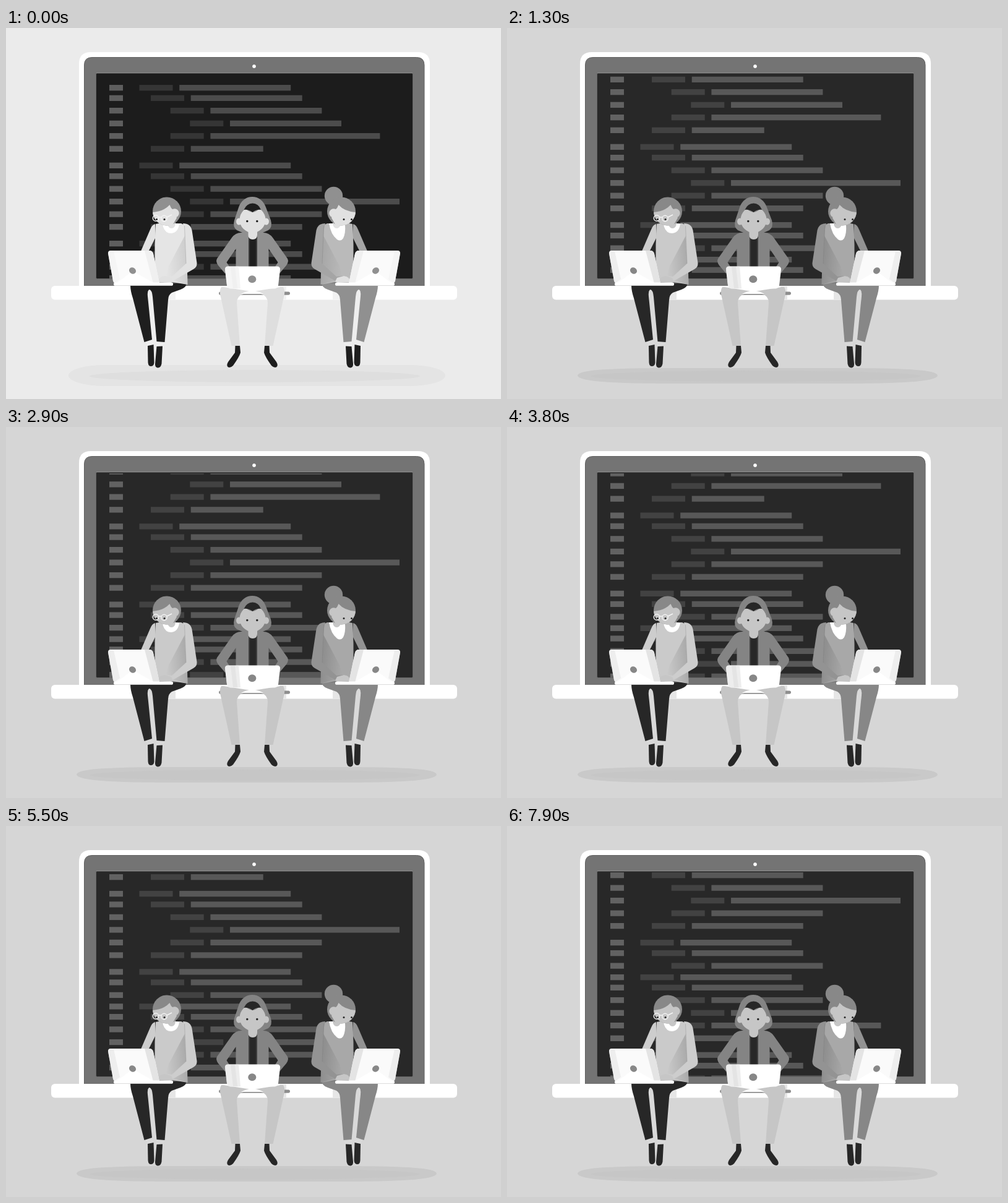
Recreate the animation shown at these times as an HTML page. Size 800 by 600 pixels, loop 8 s.

```html
<!DOCTYPE html>
<html lang="en">
<head>
<meta charset="utf-8">
<title>Three coders</title>
<style>
html, body { margin: 0; width: 100%; height: 100%; overflow: hidden; }
svg {
  display: block; width: 800px; height: 600px;
  --bg: #d6d6d6; --screen: #282828; --number: #626262; --label: #424242; --bar: #585858;
  --skin: #c6c6c6; --hair: #888; --hood: #848484; --dark: #272727;
  --pale: #c6c6c6; --mid: #878787; --shelfShade: #e6e6e6; --lidShade: #e4e4e4; --ankle: #d9d9d9;
  --sweater: #cacaca; --sleeve: #cdcdcd; --jacket: #a8a8a8; --cuff: #939393; --fold: .17;
}
svg.intro {
  --bg: #ebebeb; --screen: #1c1c1c; --number: #5e5e5e; --label: #353535; --bar: #4c4c4c;
  --skin: #e1e1e1; --hair: #909090; --hood: #909090; --dark: #1e1e1e;
  --pale: #dedede; --mid: #909090; --shelfShade: #f2f2f2; --lidShade: #f0f0f0; --ankle: #eee;
  --sweater: #e5e5e5; --sleeve: #e2e2e2; --jacket: #bababa; --cuff: #a5a5a5; --fold: .11;
}
.intro .settled, svg:not(.intro) .opening { display: none; }
</style>
</head>
<body>
<svg id="stage" viewBox="0 0 800 600" class="intro">
  <defs>
    <clipPath id="window"><rect x="146" y="75" width="511" height="330"/></clipPath>
    <clipPath id="head"><circle cx="260" cy="296.5" r="23"/></clipPath>
    <linearGradient id="fold" x1="1" y1=".4" x2="0" y2=".6">
      <stop offset="0" stop-color="#000"/><stop offset="1" stop-color="#000" stop-opacity="0"/>
    </linearGradient>
  </defs>
  <rect width="800" height="600" fill="var(--bg)"/>
  <g class="opening">
    <rect x="101" y="545" width="609" height="34" rx="58" ry="17" fill="#e4e4e4"/>
    <ellipse cx="402" cy="563" rx="267" ry="10" fill="#dedede"/>
  </g>
  <g class="settled">
    <path d="M114 562C116 553 160 550 270 550H540C650 550 694 553 696 562C694 571 650 575 540 575H270C160 575 116 571 114 562Z" fill="#c9c9c9"/>
    <ellipse cx="402" cy="563" rx="266" ry="9" fill="#c6c6c6"/>
  </g>
  <path d="M118 420V58Q118 39 137 39H666Q685 39 685 58V420Z" fill="#fff"/>
  <path d="M126.5 418V60Q126.5 47.5 139 47.5H663.500Q676 47.5 676 60V418Z" fill="#747474" stroke="#626262"/>
  <rect x="145.500" y="73" width="512" height="332.500" rx="2" fill="var(--screen)" stroke="#666"/>
  <path d="M146 72.500H657" stroke="#8b8b8b"/>
  <circle cx="401" cy="62" r="3.500" fill="#fff" stroke="#606060"/>
  <g clip-path="url(#window)"><g id="code"></g></g>
  <rect x="73" y="417" width="656" height="22.500" rx="6" fill="#fff"/>
  <g id="people"></g>
</svg>
<script>
const stage = document.getElementById('stage');
const code = document.getElementById('code');
const LOOP = 8000, STEP = 100, PERIOD = 308;

const path = (d, fill, extra = '') => `<path d="${d}" fill="${fill}" ${extra}/>`;
const dot = (x, y, rx, fill, ry = rx) => `<ellipse cx="${x}" cy="${y}" rx="${rx}" ry="${ry}" fill="${fill}"/>`;
const v = name => `var(--${name})`;

// Each row: top, indent level, optional bar width.
const rows = [
  [92, 0], [108.700, 1], [129, 2], [149.700, 3], [170, 2, 274], [190.700, 1, 117],
  [217.700, 0], [235, 1], [255.500, 2], [276, 3, 274], [296.500, 2], [317, 1],
  [344, 0], [361, 1], [381.500, 2]
];
const indents = [215.500, 234, 265.700, 297.300];

function codeBlock(offset) {
  return rows.map(([top, level, width = 180]) => {
    const x = indents[level];
    const block = (left, w, fill) => `<rect x="${left}" y="${top + offset}" width="${w}" height="9.300" fill="${v(fill)}"/>`;
    return block(167, 22, 'number') + block(x, 54, 'label') + block(x + 64.700, width, 'bar');
  }).join('');
}

function sideHead(glasses) {
  const rings = glasses
    ? '<g fill="none" stroke="#f4f4f4" stroke-width="1.500"><circle cx="242" cy="307.500" r="4.700"/><circle cx="255.500" cy="308" r="4.700"/><path d="M246.500 306L251 306M260 306L268 302"/></g>'
    : '';
  return dot(267.500, 316, 6.500, v('skin'), 8)
    + `<g clip-path="url(#head)"><rect x="236" y="272" width="48" height="48" fill="${v('hair')}"/>`
    + path('M236 298Q255 297 264.500 286Q266 291 270 294L276 307L268 321H236Z', v('skin')) + '</g>'
    + dot(272.500, 299.500, 7.200, v('skin'))
    + path('M262 301L272 306Q274 315 267 320L255 318Z', v('skin'))
    + rings + dot(243.500, 309.500, 1.500, v('dark')) + dot(256, 309.500, 1.500, v('dark'));
}

function sideLegs(color) {
  return path('M225 426H274V439H225Z', v('shelfShade'))
    + path('M229 428Q229 423 234 423Q239 423 239 430L244 508H236Z', v('ankle'))
    + path('M226 506L237 504L238.500 514H228Z', v('ankle'))
    + path('M243 507H256L254 516H243Z', v('ankle'))
    + path('M229 514L238.500 512L239.500 541Q239 547 234 547Q230 547 229.500 541Z', v('dark'))
    + path('M243.500 515L253 514.500L251.500 543Q250 550 245 549.500Q240.500 548.500 241 543Z', v('dark'))
    + path('M201 416L291 412Q293 419 282 423L268 428Q262.500 431 262 440L256.500 508L243.500 507L237 435Q236 424 232 423Q228 424 229 434L236 504L223.500 508L205 437Q201 425 201 416Z', color);
}

function sideLaptop() {
  return path('M169 360H232Q236.500 360 238 365L248 413H178Q174 413 173 409L165 365Q164.500 360 169 360Z', '#fafafa')
    + path('M224 360H232Q236.500 360 238 365L248 413H238Z', v('lidShade'))
    + path('M167 361L174 361L184 406L176 412Q174 412 173 409L165 365Z', v('lidShade'), 'opacity=".55"')
    + path('M205 393L178 413H240Z', '#fff')
    + `<ellipse cx="204.500" cy="392.500" rx="5.800" ry="5" transform="rotate(35 204.500 392.500)" fill="${v('mid')}"/>`
    + '<rect x="174" y="411.500" width="96" height="5.300" rx="2.600" fill="#fff"/>';
}

function sidePerson({ body, sleeve, legs, collar, glasses, bun }) {
  return sideLegs(legs)
    + path('M241 317Q236 318 233 326L217.500 362H230L242 338Z', sleeve)
    + path('M242 317Q250 315 257 316H283L291 320L293.500 415L270 411H240.500V350Z', body)
    + path('M290 334L293.500 415L257 405L263 385Z', 'url(#fold)', 'style="opacity:var(--fold)"')
    + path('M286 316Q298 316 300.500 327L308.500 380Q309 387 303 390L268 410H246Q248 402 256 401L268 402L291 381L288 325Z', sleeve)
    + path('M288.500 320L291 381', 'none', 'stroke="#777" stroke-width=".7" opacity=".45"')
    + path('M246 411Q246 402 256 401L267 404L270 410L266 412Z', v('skin'))
    + path(collar, '#fff')
    + (bun ? dot(272.500, 271.500, 14.700, v('hair')) : '')
    + sideHead(glasses) + sideLaptop();
}

const mirror = (art, axis) => `<g transform="translate(${axis} 0) scale(-1 1)">${art}</g>`;

function hoodedPerson() {
  const half = path('M352 419L377 423Q398 426 398 428L384 430Q373 433 373 445L378 514H364.500L347 435Q344 424 348 419Z', v('pale'))
    + path('M370.500 514H378L379 525Q377 532 367 546Q363 550 359 548.500Q355.500 546 359 540L370 525Z', v('dark'))
    + path('M398 331H380Q371 331 365 339L341 373Q338.500 378 343 384L354 397L361 386L356.500 379L371.500 357V388H398Z', v('hood'));
  return path('M442 418H453V439H442Z', v('shelfShade'))
    + '<rect x="344" y="426.500" width="115" height="5.200" rx="2.600" fill="#8e8e8e"/>'
    + half + mirror(half, 796)
    + path('M380 430Q398 420 416 430Z', '#fff')
    + path('M392 334H406V388H392Z', v('dark'))
    + path('M393 340V387M405 340V387', 'none', 'stroke="#666" stroke-width=".8"')
    + path('M398 273C388 273 380 279 376 290L369 311Q366 322 373 327L391 335H406L424 327Q431 322 428 311L420 290C416 279 408 273 398 273Z', v('hood'))
    + dot(376.500, 313, 4.500, v('skin'), 5.500) + dot(420.500, 313, 4.500, v('skin'), 5.500)
    + dot(398.500, 310, 21, v('skin'))
    + path('M379 301Q387 283 398.500 283Q410 283 418 301Q414 293 411 291Q404 298 398.500 298Q392 297 387 292Q382 295 379 301Z', v('hood'))
    + path('M384.500 294Q389 283.500 398.500 283.500Q408 283.500 412 294Q405 293 398.500 298Q391 293 384.500 294Z', v('dark'))
    + path('M391.500 327H406V335Q406 342 398.700 342Q391.500 342 391.500 335Z', v('skin'))
    + dot(389.800, 312.500, 1.700, v('dark')) + dot(405.800, 312.500, 1.700, v('dark'))
    + path('M359 385.500H438Q443.500 385.500 443 391L440 416Q439 421 434 421.500H363Q358 421 357 416L354 391Q353.500 385.500 359 385.500Z', '#fff')
    + path('M359 385.500H376L379 421.500H363Q358 421 357 416L354 391Q353.500 385.500 359 385.500Z', v('lidShade'), 'opacity=".65"')
    + path('M363 386H370L374 421H367Z', v('lidShade'))
    + dot(397.800, 406.300, 6.500, v('mid'), 6);
}

code.innerHTML = codeBlock(0) + codeBlock(PERIOD);
document.getElementById('people').innerHTML =
  sidePerson({
    body: v('sweater'), sleeve: v('sleeve'), legs: v('dark'), glasses: true,
    collar: 'M253 318Q256 332 267 332Q278 331 280 317L273 316H258Z'
  })
  + hoodedPerson()
  + mirror(sidePerson({
    body: v('jacket'), sleeve: v('cuff'), legs: v('mid'), bun: true,
    collar: 'M254 318Q253 332 257 340Q261 346 267 342Q277 334 280 316H262Z'
  }), 802);

function draw(now) {
  const t = Math.floor((now % LOOP) / STEP) * STEP;
  const opening = t < STEP;
  const shift = opening ? 0 : 4.400 + t * 0.0197;
  stage.classList.toggle('intro', opening);
  code.setAttribute('transform', `translate(0 ${-shift})`);
}

const start = performance.now();
function tick() {
  draw(performance.now() - start);
  requestAnimationFrame(tick);
}
tick();
</script>
</body>
</html>
```
